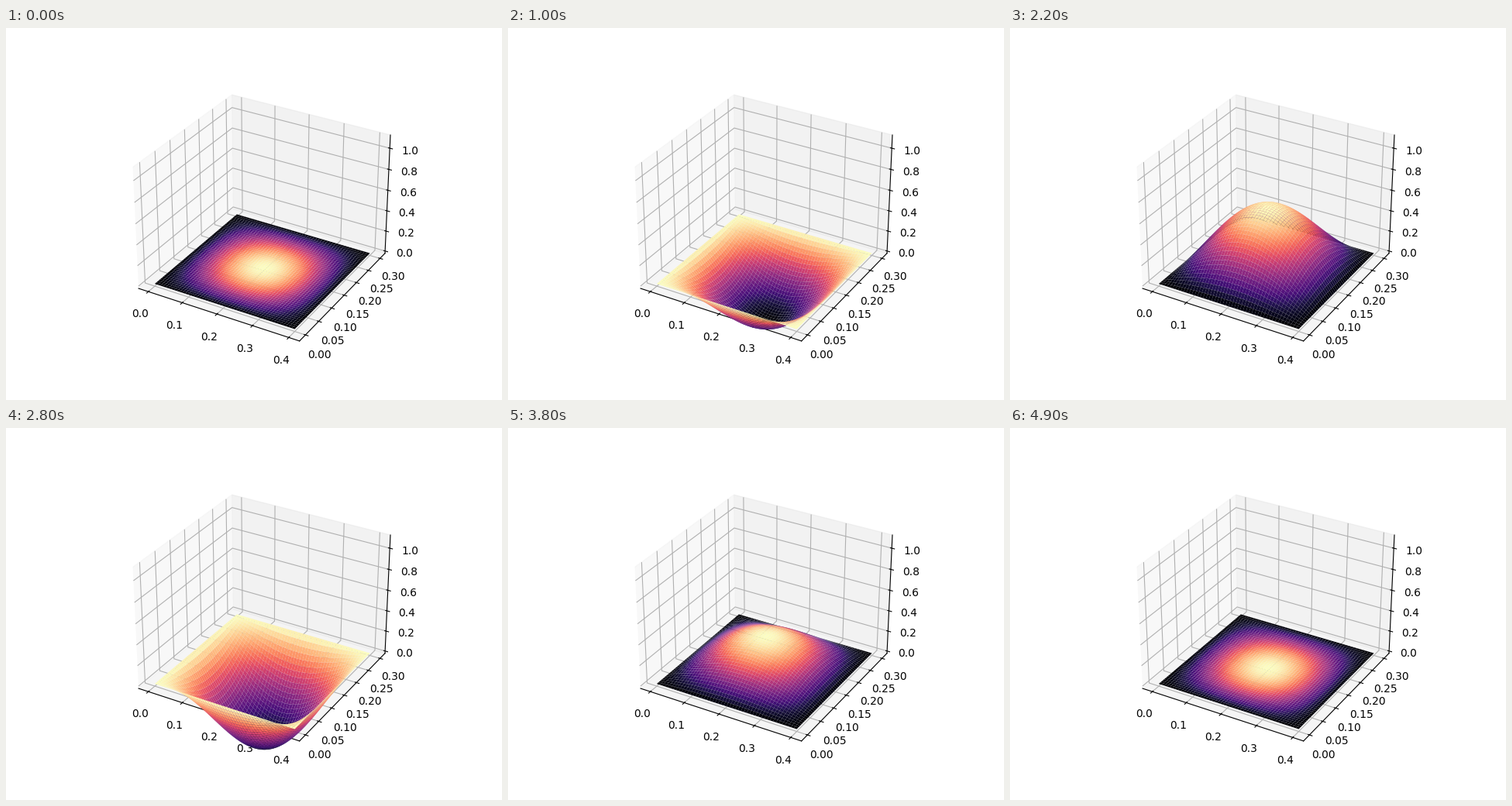
Animation of 640 by 480 pixels, one loop 5 s. Source, as a matplotlib script:

```python
import numpy as np
import matplotlib.pyplot as plt
from matplotlib.animation import FuncAnimation

WIDTH, DEPTH, HEIGHT = 0.4, 0.3, 1.1
FRAMES, INTERVAL = 50, 100
CYCLES = 2

fig = plt.figure(figsize=(6.4, 4.8), dpi=100)
ax = fig.add_subplot(projection="3d")
pad = HEIGHT / 48
ax.set_zlim(-pad, HEIGHT + pad)

x, y = np.meshgrid(np.linspace(0, WIDTH, 50), np.linspace(0, DEPTH, 50))
mode = np.sin(np.pi * x / WIDTH) * np.sin(np.pi * y / DEPTH)
surface = None


def amplitude(frame):
    # The small offset keeps the colour range non-empty when the membrane is flat.
    return 1e-9 - np.sin(2 * np.pi * CYCLES * frame / (FRAMES - 1))


def update(frame):
    global surface
    if surface is not None:
        surface.remove()
    surface = ax.plot_surface(x, y, amplitude(frame) * mode, cmap="magma")
    return [surface]


anim = FuncAnimation(fig, update, frames=FRAMES, interval=INTERVAL,
                     repeat=True, repeat_delay=0)
plt.show()
```
